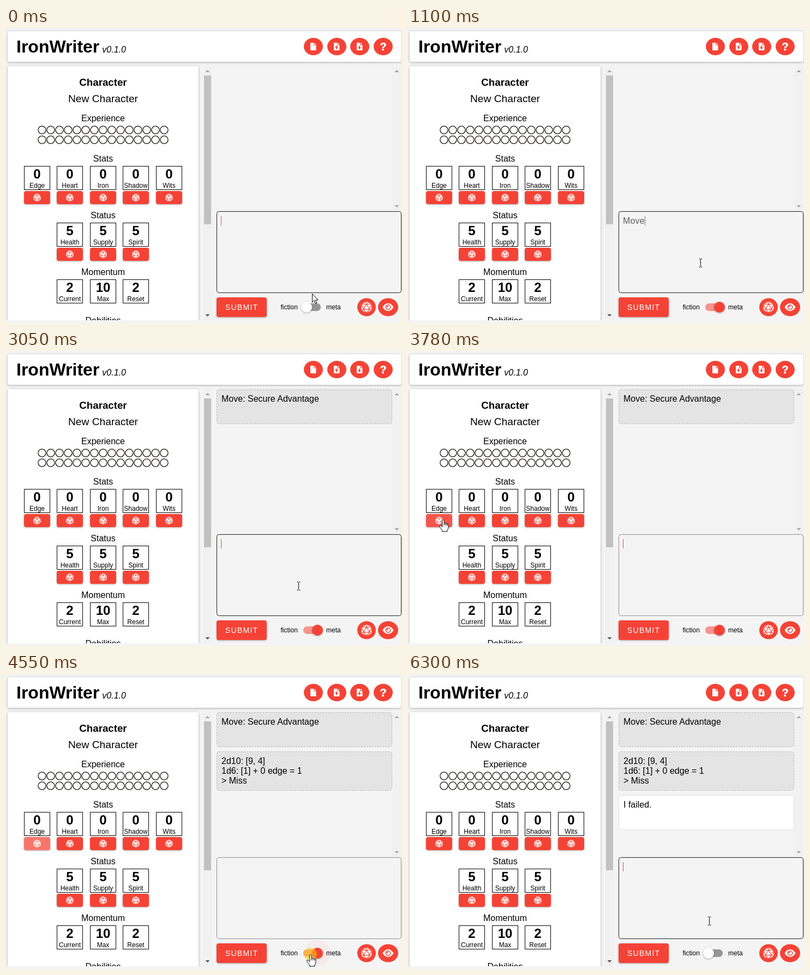
Animation of 726x541 px, one loop 6550 ms. Source, as an HTML page:

```html
<!DOCTYPE html>
<html lang="en">
<head>
<meta charset="utf-8">
<title>IronWriter</title>
<style>
  html, body { margin: 0; width: 100%; height: 100%; overflow: hidden; background: #f4f4f4; }
  svg { display: block; font: 16px "Liberation Sans", Arial, sans-serif; }
  .mid { text-anchor: middle; }
  .small { font-size: 12px; }
  .num { font-size: 24px; font-weight: bold; }
  .red { fill: #f44336; }
  .lift { filter: drop-shadow(0 1.5px 1.5px rgba(0,0,0,.32)); }
  .panel { fill: #fff; filter: drop-shadow(0 1px 2px rgba(0,0,0,.3)); }
  .box { fill: #fff; stroke: #000; }
  .meta { fill: #e4e4e4; stroke: #b8b8b8; stroke-dasharray: 3 2; }
  .fiction { fill: #fff; stroke: #e0e0e0; }
  .typed { fill: #5f5f5f; letter-spacing: .15px; white-space: pre; }
  .cursor { fill: #fff; stroke: #000; stroke-linejoin: round; }
</style>
</head>
<body>
<svg id="stage" width="726" height="541" viewBox="0 0 726 541"></svg>
<script>
const LOOP = 6550, BLINK = 260;
const stage = document.getElementById('stage');

// Drawing helpers
const text = (x, y, s, cls = '', extra = '') => `<text x="${x}" y="${y}" class="${cls}" ${extra}>${s}</text>`;
const rect = (x, y, w, h, cls = '', r = 0, extra = '') =>
  `<rect x="${x}" y="${y}" width="${w}" height="${h}" rx="${r}" class="${cls}" ${extra}/>`;
const oval = (x, y, rx, ry, cls, extra = '') => `<ellipse cx="${x}" cy="${y}" rx="${rx}" ry="${ry}" class="${cls}" ${extra}/>`;
const at = (x, y, body, scale = 1) => `<g transform="translate(${x} ${y}) scale(${scale})">${body}</g>`;
const group = (id, body, extra = '') => `<g id="${id}" ${extra}>${body}</g>`;

const d20 = `<path d="M0-10 8.8-5V5L0 10-8.8 5V-5Z" fill="#fff"/>
  <path d="M0-10V-5.5L-5.2 3.6H5.2L0-5.5M-8.8-5 0-5.5 8.8-5M-8.8-5-5.2 3.6-8.8 5M8.8-5 5.2 3.6 8.8 5M-5.2 3.6 0 10 5.2 3.6"
  fill="none" stroke="#f44336" stroke-width="1.15"/>`;
const page = mark => `<path d="M-5-7H1V-2.5H5.5V6Q5.5 7 4.5 7H-4Q-5 7-5 6ZM2-7 5.5-3.5H2Z" fill="#fff"/>
  <path d="${mark}" class="red"/>`;
const eye = `<path d="M-10 0Q-6-7 0-7T10 0Q6 7 0 7T-10 0Z" fill="#fff"/>
  <circle r="5" class="red"/><circle r="3.4" fill="#fff"/><circle cx="-1.4" cy="-1.4" r="1.5" class="red"/>`;

const header = () => rect(3, 6, 722, 56, 'panel', 4)
  + text(19, 45, 'IronWriter', '', 'font-size="32" font-weight="bold"')
  + text(176.3, 45, 'v0.1.0', '', 'font-style="italic"')
  + [563.5, 606.5, 648.5, 691.5].map(x => oval(x, 34, 17.5, 16, 'red')).join('')
  + at(563, 34, page(''))
  + at(606, 34, page('M0-2 3.2 1.4H1V4.5H-1V1.4H-3.2Z'))
  + at(648, 34, page('M0 5 3.2 1.6H1V-1.5H-1V1.6H-3.2Z'))
  + text(691.5, 41, '?', 'mid', 'font-size="20" font-weight="bold" fill="#fff" stroke="#fff" stroke-width=".6"');

const column = i => Math.round(33 + 60.4 * i);
const stat = (col, y, value, label, rolls) => {
  const x = column(col);
  return rect(x + .5, y + .5, 47, 43, 'box')
    + text(x + 24, y + 23, value, 'num mid') + text(x + 24, y + 40, label, 'small mid')
    + (rolls ? rect(x, y + 46, 48, 24, 'red lift', 4) + at(x + 24, y + 58, d20, .75) : '');
};
const section = (title, y, first, items, rolls) => text(178, y - 8, title, 'mid')
  + items.map(([label, value], i) => stat(first + i, y, value, label, rolls)).join('');

const experience = () => Array.from({ length: 30 }, (_, i) =>
  `<circle cx="${66 + 16 * (i % 15)}" cy="${i < 15 ? 187 : 205}" r="7.1" fill="none" stroke="#1c1613" stroke-width="1.3"/>`).join('');

const sheet = () => rect(3, 70, 350, 480, 'panel', 4)
  + text(178, 106, 'Character', 'mid', 'font-size="18.72" font-weight="bold"')
  + text(178, 136, 'New Character', 'mid', 'font-size="19.2"')
  + text(178, 171, 'Experience', 'mid') + experience()
  + section('Stats', 253, 0, ['Edge', 'Heart', 'Iron', 'Shadow', 'Wits'].map(s => [s, 0]), true)
  + section('Status', 357, 1, ['Health', 'Supply', 'Spirit'].map(s => [s, 5]), true)
  + section('Momentum', 461, 1, [['Current', 2], ['Max', 10], ['Reset', 2]], false)
  + text(178, 542, 'Debilities', 'mid')
  + rect(0, 536, 380, 5, '', 0, 'fill="#f4f4f4"')
  + rect(33, 299, 48, 24, '', 4, 'id="edgeTint" fill="#fff"');

const arrowMark = (x, y, dir, fill) => `<path d="M${x - 4} ${y + 2 * dir}h8l-4 ${-4 * dir}z" fill="${fill}"/>`;
const scrollbars = () => rect(361, 70, 17, 466, '', 0, 'fill="#f1f1f1"') + rect(708, 70, 17, 265, '', 0, 'fill="#f1f1f1"')
  + rect(363, 87, 13, 273, '', 0, 'fill="#c1c1c1"')
  + arrowMark(369.5, 79, 1, '#a3a3a3') + arrowMark(369.5, 527, -1, '#505050')
  + arrowMark(716.5, 79, 1, '#a3a3a3') + arrowMark(716.5, 327, -1, '#a3a3a3');

const card = (id, y, h, cls, lines) => group(id, rect(386.5, y + .5, 321, h - 1, cls, 4)
  + lines.map((s, i) => text(395, y + 23 + 18 * i, s)).join(''));

const editor = () => card('move', 70, 64, 'meta', ['Move: Secure Advantage'])
  + card('roll', 142, 72, 'meta', ['2d10: [9, 4]', '1d6: [1] + 0 edge = 1', '&gt; Miss'])
  + card('story', 222, 64, 'fiction', ['I failed.'])
  + rect(386.5, 336.5, 338, 149, '', 4, 'id="field" fill="#f4f4f4"')
  + text(394, 359, '', 'typed', 'id="typed"') + rect(394, 345, 1, 17, '', 0, 'id="caret"')
  + rect(386, 494, 92, 36, 'red lift', 4) + rect(386, 494, 92, 36, '', 4, 'id="submitTint" fill="#fff"')
  + text(402, 517, 'SUBMIT', '', 'font-size="14" letter-spacing="1.25" fill="#fff"')
  + text(503.5, 516, 'fiction', 'small') + text(587, 516, 'meta', 'small')
  + rect(545, 505, 32, 14, '', 7, 'id="track"')
  + '<circle id="ripple" cy="512" r="24"/><circle id="thumb" cy="512" r="10" class="lift"/>'
  + oval(661, 512, 17, 16.5, 'red') + oval(700.5, 512, 18.5, 16.5, 'red')
  + at(661, 512, d20, 1.05) + at(700.5, 512, eye);

const pointer = () => '<circle id="flash" fill="#ffd800"/>' + group('pointer',
  group('arrow', '<path d="M.5.5V16L4 12.6 6.4 18.2 8.8 17.2 6.4 11.8H11.2Z"/>')
  + group('hand', `<path d="M-1.2 1.6Q.5-.8 2.2 1.6V7Q3.7 5.7 5 7.6 6.7 6.5 7.7 8.4 9.5 7.5 10 9.8V15Q9.6 18 8 19.5V22H-1.5V19.5Q-3.5 17-6 13.4-7.3 11-5 10.6-3.2 11.2-1.2 13.6Z"/>
      <path d="M2.2 7V11M5 7.6V11.2M7.7 8.4V11.5" fill="none"/>`)
  + group('beam', '<path d="M-2.5-7.5H-.5L.5-6.5 1.5-7.5H3.5M.5-6.5V6.5M-2.5 7.5H-.5L.5 6.5 1.5 7.5H3.5" fill="none"/>'),
  'class="cursor"');

stage.innerHTML = header() + sheet() + scrollbars() + editor() + pointer();
const el = Object.fromEntries([...stage.querySelectorAll('[id]')].map(e => [e.id, e]));

// Timeline: rows are [time, ...values]
const path = [[0, 561, 487], [40, 561, 487], [160, 558, 514], [380, 558, 514], [470, 544, 444], [600, 536, 431],
  [3310, 536, 431], [3410, 480, 478], [3490, 430, 507], [3600, 260, 425], [3760, 64, 309], [4060, 64, 309],
  [4500, 558, 514], [4610, 558, 514], [4750, 552, 453], [LOOP, 552, 453]];
const thumbTrack = [[0, 551], [230, 551], [300, 571], [4580, 571], [4650, 551], [LOOP, 551]];
const rippleTrack = [[0, 0], [190, 0], [250, .18], [550, .18], [640, 0], [4500, 0], [4550, .05],
  [4630, .16], [4760, .16], [4850, 0], [LOOP, 0]];
const edgeTrack = [[0, 0], [3740, 0], [3770, .1], [3900, .1], [3960, .3], [4100, .27], [4560, .27], [4640, 0], [LOOP, 0]];
const clicks = [200, 540, 3900, 4535, 4765];
const focusSpans = [[0, 200], [550, 3900], [4770, LOOP]];

const sample = (rows, t) => {
  const i = Math.max(1, rows.findIndex(r => r[0] > t));
  const [a, b] = [rows[i - 1], rows[i]];
  const k = (t - a[0]) / (b[0] - a[0]);
  return a.slice(1).map((v, n) => v + (b[n + 1] - v) * k);
};

const keys = [];
const type = (s, first, last) => [...s].forEach((char, i) =>
  keys.push({ time: first + (last - first) * i / Math.max(1, s.length - 1), char }));
const clear = time => keys.push({ time, char: null });
type('Move', 880, 1100);
type(':', 1250, 1250);
type(' Secure ', 1450, 2070);
type('Advantage', 2160, 2810);
clear(3050);
type('I ', 5270, 5360);
type('failed.', 5520, 5870);
clear(6300);
const caretResets = [-210, 550, 4770, ...keys.map(k => k.time)];

const within = ([x, y], l, t, r, b) => x >= l && x < r && y >= t && y < b;
const overField = p => within(p, 386, 336, 725, 486);
const overSubmit = p => within(p, 386, 494, 478, 530);
const overButton = p => overSubmit(p) || within(p, 541, 498, 582, 526) || within(p, 33, 299, 81, 323);

const set = (node, attrs) => Object.entries(attrs).forEach(([k, v]) => node.setAttribute(k, v));
const show = (node, on) => node.setAttribute('visibility', on ? 'visible' : 'hidden');

function drawField(t) {
  const value = keys.filter(k => k.time <= t).reduce((s, k) => k.char === null ? '' : s + k.char, '');
  if (el.typed.textContent !== value) el.typed.textContent = value;
  const reset = Math.max(...caretResets.filter(r => r <= t));
  const focused = focusSpans.some(([a, b]) => t >= a && t < b);
  show(el.caret, focused && Math.floor((t - reset) / BLINK) % 2 === 0);
  const width = value ? el.typed.getComputedTextLength() : 0;
  set(el.caret, { x: Math.round(394 + width), fill: value ? '#777' : '#f44336' });
  const hovered = overField(sample(path, (t - 80 + LOOP) % LOOP));
  set(el.field, { stroke: hovered ? '#202020' : '#8f8f8f' });
}

function drawSwitch(t) {
  const [cx] = sample(thumbTrack, t);
  const on = cx > 561;
  set(el.track, { fill: on ? '#f7938c' : '#969696' });
  set(el.thumb, { cx, fill: on ? '#f44336' : '#fff' });
  set(el.ripple, { cx, fill: on ? '#f44336' : '#999', opacity: sample(rippleTrack, t)[0] });
}

function drawPointer(t) {
  const p = sample(path, t);
  const [x, y] = p.map(Math.round);
  const kind = overField(p) ? 'beam' : overButton(p) ? 'hand' : 'arrow';
  ['arrow', 'hand', 'beam'].forEach(k => show(el[k], k === kind));
  set(el.pointer, { transform: `translate(${x} ${y})` });
  set(el.submitTint, { opacity: overSubmit(p) ? .08 : 0 });
  const click = clicks.find(c => t >= c && t < c + 180);
  show(el.flash, click !== undefined);
  if (click !== undefined) {
    const k = (t - click) / 180;
    set(el.flash, { cx: x, cy: y, r: 11 + 9 * k, opacity: .55 * (1 - k) });
  }
}

function render(t) {
  show(el.move, t >= 3050);
  show(el.roll, t >= 3950);
  show(el.story, t >= 6300);
  set(el.edgeTint, { opacity: sample(edgeTrack, t)[0] });
  drawField(t);
  drawSwitch(t);
  drawPointer(t);
}

const start = performance.now();
function tick() {
  render((performance.now() - start) % LOOP);
  requestAnimationFrame(tick);
}
tick();
</script>
</body>
</html>
```
